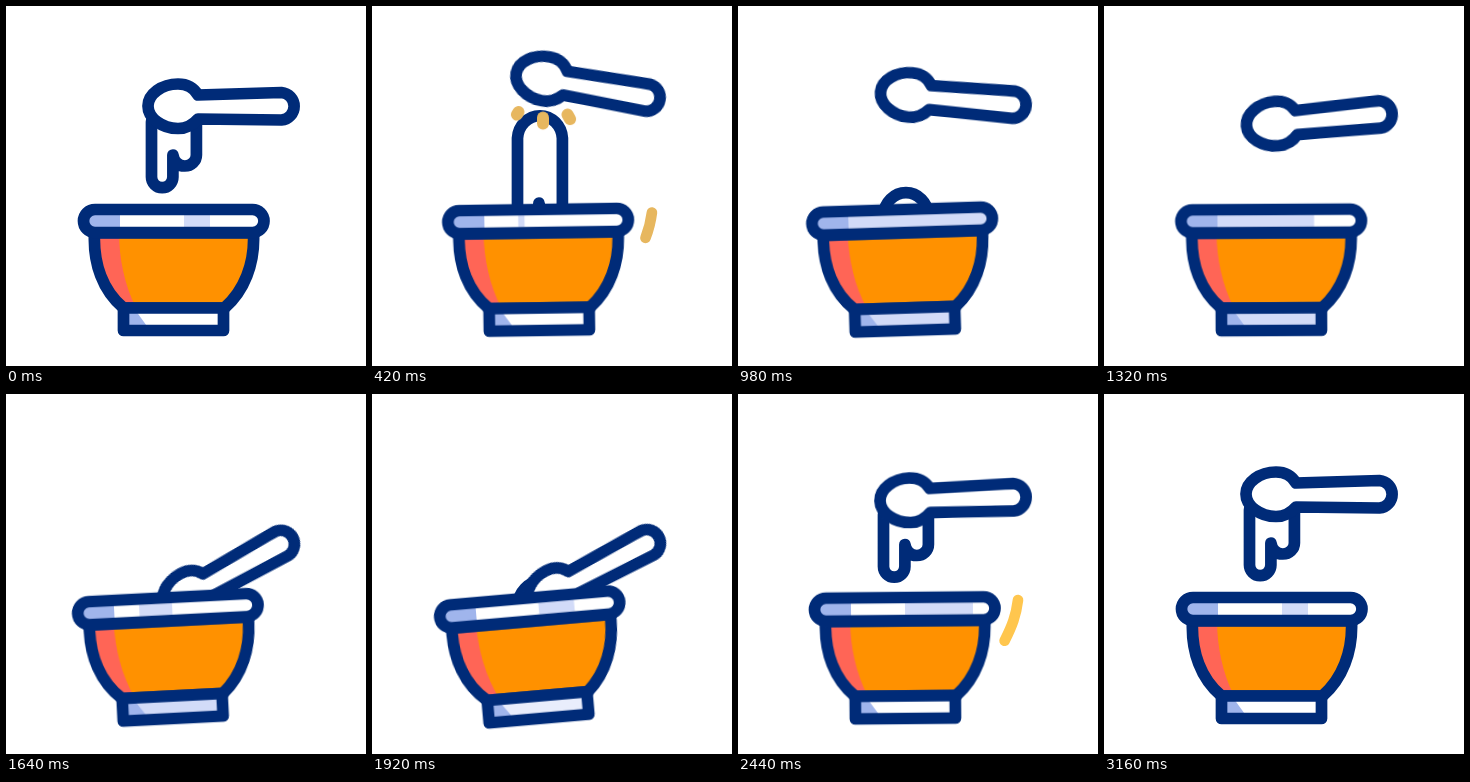
These frames come from a looping animation (360 px wide and 360 px high, 3200 ms). An HTML page without scripts:

```html
<!DOCTYPE html>
<html lang="en">
<head>
<meta charset="utf-8">
<title>Honey bowl</title>
<style>
  html, body { margin: 0; width: 100%; height: 100%; overflow: hidden; background: #fff; }
  svg { display: block; width: 100vw; height: 100vh; }
  .line { stroke: #002b78; stroke-width: 11.7; stroke-linejoin: round; stroke-linecap: round; }
  .white { fill: #fff; }
  .blue { fill: #a0b5ec; }
  .pale { fill: #d2dbf8; }
  .spoon, .honey, .bowl, .band, .foot, .swirl, .drops path { animation: 3.2s linear infinite; }

  .spoon { transform-origin: 276px 100px; animation-name: spoon; }
  @keyframes spoon {
    0%, 7.5% { transform: translateY(0) rotate(0); animation-timing-function: ease-in-out; }
    13.125% { transform: translateY(-8.5px) rotate(10.5deg); animation-timing-function: ease-in-out; }
    24% { transform: translateY(-2.5px) rotate(6.2deg); }
    30.625% { transform: translateY(-1.5px) rotate(5.4deg); animation-timing-function: ease-in; }
    41.25% { transform: translateY(8px) rotate(-5deg); }
    51.25% { transform: translateY(49px) rotate(-28.7deg); animation-timing-function: ease-out; }
    55.6% { transform: translateY(54px) rotate(-31deg); animation-timing-function: ease-in; }
    67.5% { transform: translateY(24px) rotate(-12.8deg); }
    74.375% { transform: translateY(5px) rotate(-4.5deg); }
    76.25% { transform: translateY(3px) rotate(-1.7deg); animation-timing-function: ease-out; }
    81.25%, 100% { transform: translateY(0) rotate(0); }
  }

  .honey { animation-name: honey; }
  @keyframes honey {
    0%, 7.5%, 81.25%, 100% { d: path("M145.5 116V171a10.7 10.7 0 0 0 21.4 0V149c1 6 4 11 12 11a11.5 11 0 0 0 11.5 -11V116A22.5 24 0 0 0 145.5 116z"); }
    13.125% { d: path("M145.5 132V219a10.7 10.7 0 0 0 21.4 0V197c1 6 4 11 12 11a11.5 11 0 0 0 11.5 -11V132A22.5 24 0 0 0 145.5 132z"); }
    22% { d: path("M145.5 169V271a10.7 10.7 0 0 0 21.4 0V249c1 6 4 11 12 11a11.5 11 0 0 0 11.5 -11V169A22.5 24 0 0 0 145.5 169z"); }
    30.625% { d: path("M145.5 209V278a10.7 10.7 0 0 0 21.4 0V256c1 6 4 11 12 11a11.5 11 0 0 0 11.5 -11V209A22.5 24 0 0 0 145.5 209z"); }
    40%, 55.6% { d: path("M145.5 240V275a10.7 10.7 0 0 0 21.4 0V253c1 6 4 11 12 11a11.5 11 0 0 0 11.5 -11V240A22.5 24 0 0 0 145.5 240z"); }
    67.5% { d: path("M147 161V189a10.2 10.7 0 0 0 20.4 0V181c1 6 4 11 11 11a10.6 11 0 0 0 10.6 -11V161A21 24 0 0 0 147 161z"); }
    76.25% { d: path("M145.5 121V172.5a10.7 10.7 0 0 0 21.4 0V150.5c1 6 4 11 12 11a11.5 11 0 0 0 11.5 -11V121A22.5 24 0 0 0 145.5 121z"); }
  }

  .bowl { transform-origin: 168px 330px; animation-name: rock; }
  @keyframes rock {
    0%, 7.5% { transform: rotate(0); animation-timing-function: ease-in; }
    13.125% { transform: rotate(-.8deg); }
    24% { transform: rotate(-5.2deg); animation-timing-function: ease-in; }
    30.625% { transform: rotate(-1.8deg); animation-timing-function: ease-out; }
    38% { transform: rotate(0); animation-timing-function: ease-in; }
    51.25% { transform: rotate(-2.9deg); animation-timing-function: ease-out; }
    57.8% { transform: rotate(-5.2deg); animation-timing-function: ease-in; }
    67.5% { transform: rotate(-2.7deg); animation-timing-function: ease-out; }
    76.25% { transform: rotate(-.5deg); }
    81.25%, 100% { transform: rotate(0); }
  }

  /* unit-wide highlight, placed and stretched along the rim */
  .band { animation-name: band; }
  @keyframes band {
    0%, 7.5%, 93%, 100% { transform: translateX(178px) scaleX(26); }
    13.125% { transform: translateX(148px) scaleX(6); }
    30.625% { transform: translateX(83px) scaleX(169); }
    51.25% { transform: translateX(139px) scaleX(33); }
    67.5% { transform: translateX(209px) scaleX(38); }
    76.25% { transform: translateX(168px) scaleX(68); }
  }

  .foot { animation-name: foot; }
  @keyframes foot {
    0%, 15%, 66%, 100% { opacity: 0; }
    28%, 54% { opacity: 1; }
  }

  .swirl { fill: none; stroke: #ffc64e; stroke-width: 10.6; stroke-linecap: round; animation-name: swirl; }
  @keyframes swirl {
    0%, 11.4% { opacity: 0; stroke: #e7b75f; stroke-dasharray: 0 200; stroke-dashoffset: -100; }
    11.5% { opacity: 1; stroke-dasharray: 0 200; stroke-dashoffset: -100; }
    13.125% { stroke: #e7b75f; stroke-dasharray: 10.5 200; stroke-dashoffset: -89.5; }
    19% { stroke-dasharray: 62 200; stroke-dashoffset: 0; }
    23% { opacity: 1; stroke-dasharray: 0 200; stroke-dashoffset: 0; }
    23.1%, 61.2% { opacity: 0; stroke: #ffc64e; stroke-dasharray: 0 200; stroke-dashoffset: 0; }
    61.3% { opacity: 1; stroke-dasharray: 0 200; }
    67.5% { stroke-dasharray: 62 200; stroke-dashoffset: 0; }
    76.25% { stroke: #ffc64e; stroke-dasharray: 18 200; stroke-dashoffset: -82; }
    78% { opacity: 1; stroke-dasharray: 0 200; stroke-dashoffset: -100; }
    78.1%, 100% { opacity: 0; stroke-dasharray: 0 200; stroke-dashoffset: -100; }
  }

  .drops path { fill: none; stroke: #e7b75f; stroke-width: 12; stroke-linecap: round; animation-name: drop; }
  @keyframes drop {
    0%, 10.9% { opacity: 0; transform: translate(calc(var(--x) * -1), calc(var(--y) * -1)); }
    11% { opacity: 1; transform: translate(calc(var(--x) * -1), calc(var(--y) * -1)); }
    13.125% { transform: none; }
    16% { opacity: 1; transform: translate(var(--x), var(--y)); }
    16.1%, 100% { opacity: 0; transform: translate(var(--x), var(--y)); }
  }
</style>
</head>
<body>
<svg viewBox="0 0 360 360">
  <defs>
    <path id="body" d="M88.5 227C87 258 97 285 117.500 302H218.500C238 285 249 258 247.500 227z"/>
    <clipPath id="inBody"><use href="#body"/></clipPath>
    <clipPath id="inRim"><rect x="80" y="209" width="172.500" height="12" rx="6"/></clipPath>
  </defs>

  <path class="honey line white" d="M145.5 116V171a10.7 10.7 0 0 0 21.4 0V149c1 6 4 11 12 11a11.5 11 0 0 0 11.5 -11V116A22.5 24 0 0 0 145.5 116z"/>

  <g class="drops">
    <path style="--x:-6px;--y:5px" d="M146.500 106L145 108.500"/>
    <path style="--x:0px;--y:8px" d="M171 111.500V117.500"/>
    <path style="--x:5px;--y:7px" d="M195.500 108.500L198 113"/>
  </g>

  <path class="spoon line white" d="M192 89L275.500 86.500A13.800 13.800 0 0 1 275.500 114L192 113C187 119 181 122.500 172 122.500C156 122.500 142 112 142 100C142 88 156 78 172 78C181 78 188 82 192 89z"/>

  <g class="bowl">
    <use href="#body" fill="#ff9100"/>
    <path clip-path="url(#inBody)" fill="#ff6556" d="M80 225H113C113 252 118 278 131 304H80z"/>
    <use href="#body" class="line" fill="none"/>

    <rect class="white" x="117.500" y="302" width="100" height="23"/>
    <rect class="foot pale" x="117.500" y="302" width="100" height="23"/>
    <path class="blue" d="M118 305H130L143 323H118z"/>
    <rect class="line" fill="none" x="117.500" y="302" width="100" height="22.500"/>

    <rect class="white" x="77.500" y="203.500" width="180.500" height="23" rx="11.500"/>
    <g clip-path="url(#inRim)">
      <rect class="band pale" y="205" width="1" height="20"/>
      <rect class="blue" x="78" y="205" width="36" height="20"/>
    </g>
    <rect class="line" fill="none" x="77.500" y="203.500" width="180.500" height="23" rx="11.500"/>
  </g>

  <path class="swirl" pathLength="100" d="M94 240C118 268 150 288 185 287.500C202 287 216 283 232 278C250 272 262 256 267 246C274 232 278 222 280 206"/>
</svg>
</body>
</html>
```
